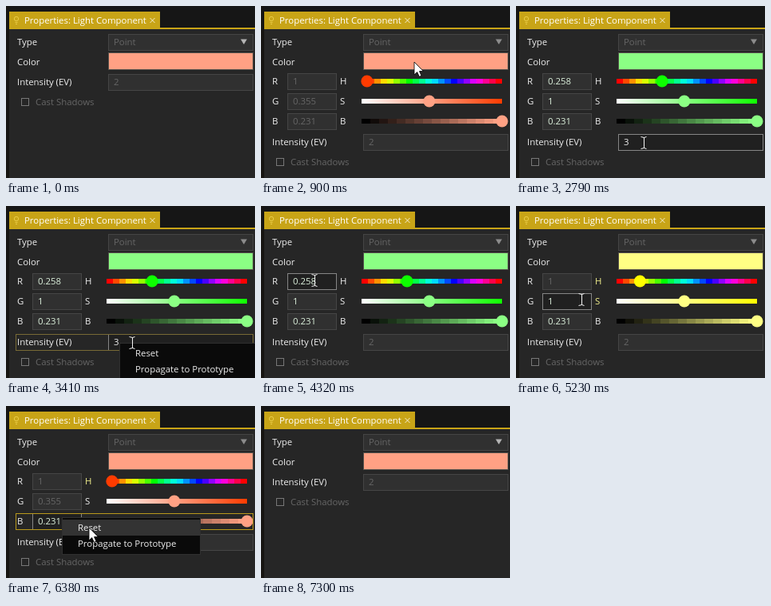
An HTML page with a canvas for the animation above (7.7 s loop, 312 by 215 pixels).

```html
<!DOCTYPE html>
<html lang="en">
<head>
<meta charset="utf-8">
<title>Light properties</title>
<style>
html, body { margin: 0; width: 100%; height: 100%; overflow: hidden; background: #262626; }
canvas { display: block; }
</style>
</head>
<body>
<canvas id="stage" width="312" height="215"></canvas>
<script>
const ctx = document.getElementById('stage').getContext('2d');
const LOOP = 7700;
const GOLD = '#c8a417', WHITE = '#eeeeee', DIM = '#666666', PALE = '#f2f08c';
const TRACK = { x: 126, w: 176 };

// Bursts of evenly spaced steps: first, last, count
const bursts = [[200, 1150, 5], [1390, 2340, 5], [2560, 3030, 3], [3410, 4320, 5],
  [4550, 5460, 5], [5680, 6610, 5], [6840, 7300, 3]];
const times = [0];
for (const [a, b, n] of bursts)
  for (let i = 0; i < n; i++) times.push(Math.floor((a + (b - a) * i / (n - 1)) / 10) * 10);

const start = { rgb: [1, 0.355, 0.231], set: '', ev: 2, open: false, cursor: null,
  focus: '', row: '', menu: null, hot: false, tint: '' };
const at = (x, y, more) => ({ cursor: [x, y, 'arrow'], ...more });
const beam = (x, y, more) => ({ cursor: [x, y, 'beam'], ...more });
const closed = { menu: null, hot: false, focus: '', row: '' };

// One change of state per step
const script = [
  {},
  at(208, 140), at(200, 72), at(192, 70, { open: true }), at(134, 94),
  at(150, 96, { rgb: [1, 0.8, 0.231], set: 'RGB' }),
  at(167, 96, { rgb: [0.6, 1, 0.231] }),
  at(183, 96, { rgb: [0.258, 1, 0.231] }),
  at(180, 122), at(174, 156), beam(160, 171),
  beam(160, 171, { focus: 'EV' }), { ev: 3 }, beam(143, 171),
  beam(158, 171, { menu: [142, 171], row: 'EV' }),
  at(176, 183, { hot: true }),
  at(132, 150, { ev: 2, ...closed }), at(96, 116), beam(67, 93, { focus: 'R' }),
  beam(67, 93, { menu: [64, 93], row: 'R' }),
  at(92, 106, { hot: true }),
  at(86, 112, { rgb: [1, 1, 0.231], set: 'GB', tint: 'HS', ...closed }),
  beam(82, 117, { focus: 'G' }),
  beam(82, 117, { menu: [76, 117], row: 'G' }),
  at(106, 130, { hot: true }),
  at(86, 140, { rgb: [1, 0.355, 0.231], set: 'B', tint: 'H', ...closed }),
  at(72, 141, { menu: [70, 139], row: 'B', focus: 'B' }),
  at(104, 152, { hot: true }),
  at(150, 112, { set: '', tint: '', ...closed }),
  at(190, 72), at(208, 160, { open: false }),
  { cursor: null }
];
const states = [];
script.reduce((s, change) => (states.push(s = { ...s, ...change }), s), start);

const toSrgb = v => v <= 0.0031308 ? 12.92 * v : 1.055 * v ** (1 / 2.4) - 0.055;
const css = c => `rgb(${c.map(v => Math.round(v * 255))})`;

function toHsv([r, g, b]) {
  const max = Math.max(r, g, b), min = Math.min(r, g, b), d = max - min;
  let h = 0;
  if (d) h = max === r ? (g - b) / d : max === g ? 2 + (b - r) / d : 4 + (r - g) / d;
  return { h: (h * 60 + 360) % 360, s: max ? d / max : 0, v: max };
}

function rect(x, y, w, h, fill) {
  ctx.fillStyle = fill;
  ctx.fillRect(x, y, w, h);
}

function frame(x, y, w, h, color) {
  ctx.strokeStyle = color;
  ctx.lineWidth = 1;
  ctx.strokeRect(x + 0.5, y + 0.5, w - 1, h - 1);
}

function text(str, x, mid, color = WHITE) {
  ctx.fillStyle = color;
  ctx.fillText(str, x, mid + 4);
}

function field(x, mid, w, value, color, focused) {
  rect(x, mid - 10, w, 21, focused ? '#202020' : '#303030');
  frame(x, mid - 10, w, 21, focused ? '#858585' : '#454545');
  text(value, x + 7, mid, color);
}

function knob(pos, y, color) {
  ctx.fillStyle = color;
  ctx.beginPath();
  ctx.arc(TRACK.x + TRACK.w * pos, y, 7.5, 0, 7);
  ctx.fill();
}

function bands(y, n, color) {
  const w = TRACK.w / n;
  for (let i = 0; i < n; i++) rect(TRACK.x + i * w, y - 3, w, 6, color(i / (n - 1)));
}

function chrome() {
  rect(0, 0, 312, 215, '#262626');
  rect(0, 0, 312, 28, '#161616');
  rect(0, 0, 4, 215, '#171512');
  rect(4, 27, 308, 2, GOLD);
  rect(4, 7, 189, 21, GOLD);
  ctx.strokeStyle = '#e9cb45';
  ctx.lineWidth = 1;
  ctx.beginPath();
  ctx.arc(13, 16, 2.7, 0, 7);
  ctx.moveTo(11.5, 20.5);
  ctx.lineTo(14.5, 20.5);
  ctx.moveTo(12, 22.5);
  ctx.lineTo(14, 22.5);
  ctx.stroke();
  text('Properties: Light Component', 23, 18, '#ffffff');
  ctx.strokeStyle = '#f5edcc';
  ctx.beginPath();
  ctx.moveTo(180.5, 15);
  ctx.lineTo(186.5, 21);
  ctx.moveTo(186.5, 15);
  ctx.lineTo(180.5, 21);
  ctx.stroke();
}

function picker(s, rgb) {
  const { h, s: sat, v } = toHsv(rgb);
  const pure = `hsl(${h},100%,50%)`, color = css(rgb);
  [...'RGB'].forEach((name, i) => {
    const y = 94 + i * 25, on = s.set.includes(name), label = 'HSB'[i];
    text(name, 14, y);
    field(33, y, 62, String(s.rgb[i]), on ? '#dcf0dc' : DIM, s.focus === name);
    text(label, 99, y, s.tint.includes(label) ? PALE : WHITE);
  });
  bands(94, 22, p => `hsl(${p * 360},100%,50%)`);
  knob(h / 360, 94, pure);
  const fade = ctx.createLinearGradient(TRACK.x, 0, TRACK.x + TRACK.w, 0);
  fade.addColorStop(0, '#ffffff');
  fade.addColorStop(1, pure);
  rect(TRACK.x, 116, TRACK.w, 6, fade);
  knob(sat, 119, color);
  bands(144, 16, p => css(rgb.map(c => c * p)));
  knob(v, 144, color);
}

function menu([x, y], hot) {
  rect(x, y, 174, 47, '#0a0a0a');
  frame(x, y, 174, 47, '#303030');
  if (hot) rect(x + 1, y + 3, 172, 20, '#333333');
  text('Reset', x + 20, y + 13);
  text('Propagate to Prototype', x + 20, y + 33);
}

function pointer([x, y, kind]) {
  ctx.save();
  ctx.translate(x, y);
  ctx.beginPath();
  if (kind === 'beam') {
    for (const side of [-3.5, 3.5]) {
      ctx.moveTo(side, -7.5);
      ctx.lineTo(0.5, -6.5);
      ctx.lineTo(0.5, 6.5);
      ctx.lineTo(side, 7.5);
    }
    ctx.strokeStyle = '#f4f4f4';
    ctx.lineWidth = 1;
    ctx.stroke();
  } else {
    for (const p of [[0, 0], [0, 16], [3.7, 12.6], [6.3, 18.3], [9, 17.2], [6.5, 11.6], [11.4, 11.4]])
      ctx.lineTo(...p);
    ctx.closePath();
    ctx.fillStyle = '#ffffff';
    ctx.fill();
    ctx.strokeStyle = '#000000';
    ctx.lineWidth = 0.8;
    ctx.stroke();
  }
  ctx.restore();
}

function draw(s) {
  const rgb = s.rgb.map(toSrgb), evY = s.open ? 170 : 95, castY = evY + 25;
  ctx.font = '11.4px "Open Sans", "Noto Sans", sans-serif';
  chrome();

  text('Type', 14, 45);
  field(128, 45, 182, 'Point', DIM);
  ctx.fillStyle = s.open ? '#8c8c8c' : '#b4b4b4';
  ctx.beginPath();
  ctx.moveTo(294, 41.5);
  ctx.lineTo(302, 41.5);
  ctx.lineTo(298, 48);
  ctx.fill();

  text('Color', 14, 70);
  rect(129, 59, 180, 20, css(rgb));
  frame(128, 58, 182, 22, '#55514c');
  if (s.open) picker(s, rgb);

  text('Intensity (EV)', 14, evY);
  field(128, evY, 182, String(s.ev), s.ev === 2 ? DIM : WHITE, s.focus === 'EV');
  frame(19, castY - 5, 10, 10, '#777777');
  text('Cast Shadows', 37, castY, DIM);

  if (s.row) {
    const y = s.row === 'EV' ? evY : 94 + 25 * 'RGB'.indexOf(s.row);
    frame(12, y - 10, 298, 21, s.hot ? '#b8981c' : '#786a35');
  }
  if (s.menu) menu(s.menu, s.hot);
  if (s.cursor) pointer(s.cursor);
}

const begin = performance.now();
function tick() {
  const t = (performance.now() - begin) % LOOP;
  let i = times.length - 1;
  while (times[i] > t) i--;
  draw(states[i]);
  requestAnimationFrame(tick);
}
tick();
</script>
</body>
</html>
```
